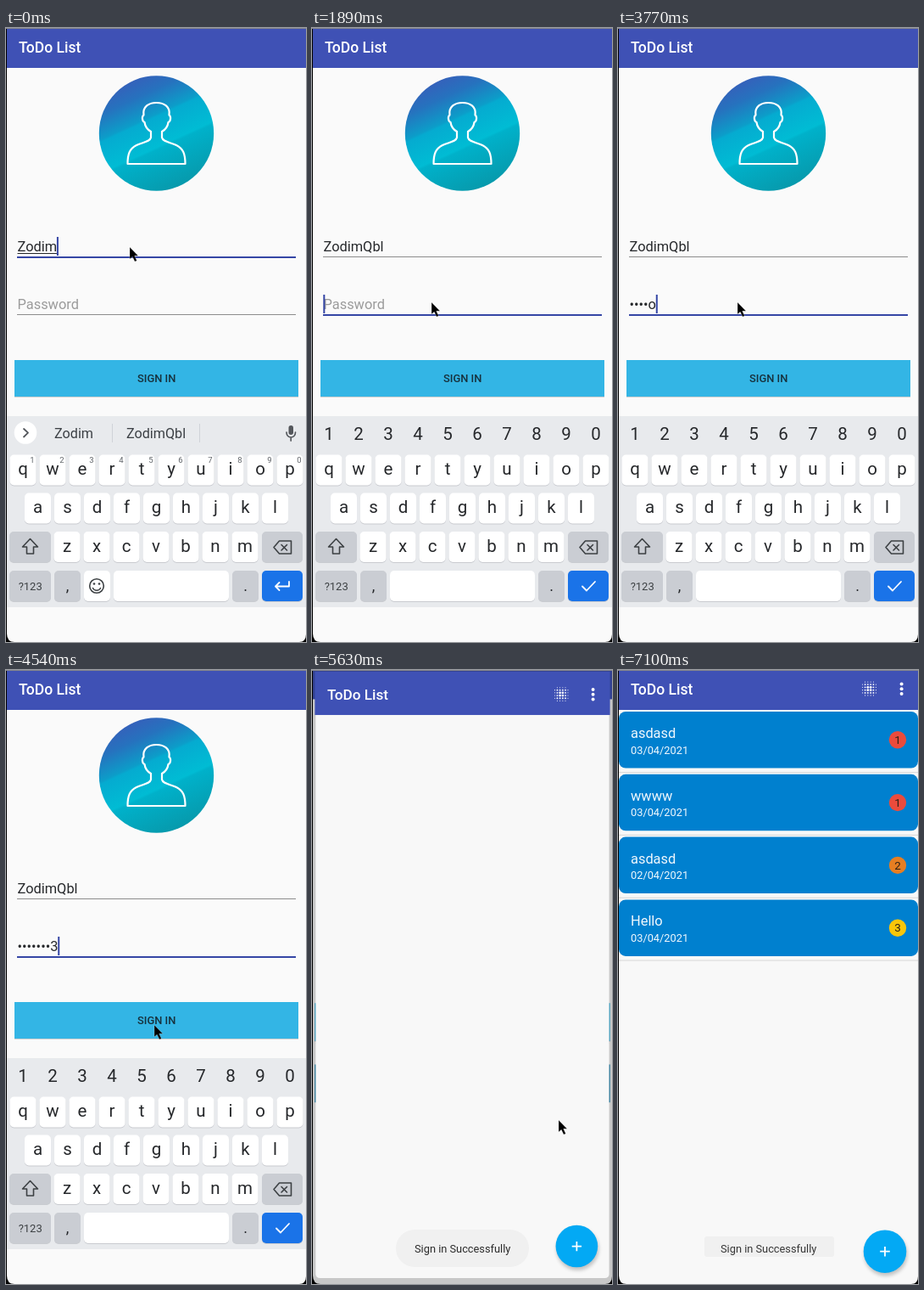
These frames come from a looping animation (354 by 723 pixels, 7.2 s). An HTML page:

```html
<!DOCTYPE html>
<html lang="en">
<head>
<meta charset="utf-8">
<title>ToDo List</title>
<style>
html, body { margin: 0; width: 100%; height: 100%; overflow: hidden; background: #fafafa; }
svg { display: block; width: 100%; height: 100%; }
text { font-family: Roboto, "Noto Sans", sans-serif; white-space: pre; }
.mid { text-anchor: middle; }
.line { fill: none; stroke-linecap: round; stroke-linejoin: round; }
</style>
</head>
<body>
<svg id="stage" viewBox="0 0 354 723" preserveAspectRatio="none"></svg>
<script>
const LOOP = 7200;
const NAME = 'Zodim', FULL = 'ZodimQbl', SECRET = 'Hello123';
const INK = '#26282b', BLUE = '#3f51b5', FOCUS = '#3546a5';

const rect = (x, y, w, h, fill, r = 0, more = '') =>
  `<rect x="${x}" y="${y}" width="${w}" height="${h}" rx="${r}" fill="${fill}" ${more}/>`;
const text = (x, y, size, str, fill = INK, more = '') =>
  `<text x="${x}" y="${y}" font-size="${size}" fill="${fill}" ${more}>${str}</text>`;
const mid = (x, y, size, str, fill = INK, more = '') =>
  text(x, y, size, str, fill, `class="mid" ${more}`);
const circle = (x, y, r, fill, more = '') =>
  `<circle cx="${x}" cy="${y}" r="${r}" fill="${fill}" ${more}/>`;
const line = (d, stroke, width, more = '') =>
  `<path class="line" d="${d}" stroke="${stroke}" stroke-width="${width}" ${more}/>`;
const group = (id, body) => `<g id="${id}">${body}</g>`;

function header() {
  return rect(0, -5, 355, 52, BLUE) + text(15, 29, 17.5, 'ToDo List', '#fff', 'font-weight="500"');
}

function avatar() {
  const head = 'M171 122C166 119 164 115 163.500 111C160.500 110 160 104 162.500 102.500' +
    'C161 93 168 88 177.500 88C187 88 194 93 192.500 102.500C195 104 194.500 110 191.500 111' +
    'C191 115 189 119 184 122';
  const body = 'M171 122V129C170 134 161 134.500 154 138C146 142 143.500 148 143.500 160' +
    'H211.500C211.500 148 209 142 201 138C194 134.500 185 134 184 129V122';
  return circle(177.5, 124, 67.7, 'url(#sky)') + line(head, '#fff', 2.2) + line(body, '#fff', 2.2);
}

function button(y, label, fill) {
  return rect(10, y, 335, 43, fill) + mid(177.7, y + 26, 12.9, label, '#17313d', 'font-weight="500"');
}

function key(cx, y, w, fill = '#fff') {
  return rect(cx - w / 2, y + 1, w, 36, '#c9cbd0', 5) + rect(cx - w / 2, y, w, 36, fill, 5);
}

function letters(row, x0, y) {
  return [...row].map((ch, i) => {
    const x = x0 + i * 35;
    return key(x, y, 31) + mid(x, y + 23.5, 20.5, ch);
  }).join('');
}

function keyboard() {
  const gray = '#cacdd3', digits = [...'1234567890'];
  const mic = rect(333.5, 468, 5.5, 11, '#54575c', 2.7) +
    line('M331 476C331 484 341.500 484 341.500 476M336.200 482V486', '#54575c', 1.7);
  const strip = circle(23, 476.5, 13.3, '#fff') +
    line('M21 472L26 476.700L21 481.500', '#54575c', 1.8) + mic +
    group('splits', rect(125, 466, 1, 22, '#d0d3d8') + rect(228, 466, 1, 22, '#d0d3d8')) +
    mid(80, 483, 16.2, NAME, '#3c4045', 'id="typed"') + mid(177, 483, 16.2, FULL, '#3c4045');
  const small = digits.map((d, i) => mid(31 + i * 35, 512, 9.5, d, '#5f6368')).join('');
  const smile = circle(107, 657, 8.3, 'none', 'stroke="#3c4043" stroke-width="1.6"') +
    circle(104, 654.5, 1.3, '#3c4043') + circle(110, 654.5, 1.3, '#3c4043') +
    line('M102.500 659.500C104 663 110 663 111.500 659.500', '#3c4043', 1.5);
  return rect(0, 457, 354, 225, '#e8eaed') +
    letters('qwertyuiop', 20, 502.5) + letters('asdfghjkl', 37.5, 547.5) + letters('zxcvbnm', 72, 593) +
    key(28.5, 593, 49, gray) + key(326, 593, 48, gray) +
    line('M28.500 601.500L19.500 611H24.500V619H32.500V611H37.500Z', '#3c4043', 1.6) +
    line('M322.500 604H336.500V619H322.500L316 611.500ZM325 608.500L331.500 615M331.500 608.500L325 615', '#3c4043', 1.6) +
    key(28.5, 639, 49, gray) + mid(28.7, 662, 13, '?123', '#3c4043') +
    key(72.5, 639, 31, gray) + mid(72.5, 663, 18, ',') +
    key(282.5, 639, 31, gray) + mid(282.5, 663, 18, '.') +
    key(326, 639, 48, '#1a73e8') +
    group('wordKeys', strip + small + key(107.5, 639, 31) + smile + key(195, 639, 136) +
      line('M334 652V657.500H318.500M322.500 653L318 657.500L322.500 662', '#fff', 1.8)) +
    group('passKeys', digits.map((d, i) => mid(20 + i * 35, 485, 20.5, d)).join('') +
      key(177.5, 639, 171) + line('M319 657.500L324 662.500L334 652', '#fff', 1.8));
}

function login() {
  return rect(0, 0, 354, 723, '#fafafa') + header() + avatar() +
    text(13.5, 263, 16.4, '', INK, 'id="user"') + rect(13.5, 265, 10, 1, INK, 0, 'id="compose"') +
    rect(13, 269, 329, 1, '#888', 0, 'id="userLine"') +
    text(13.5, 331, 16.4, '', INK, 'id="pass"') +
    rect(13, 337, 329, 1, '#888', 0, 'id="passLine"') +
    rect(0, 0, 2, 22, FOCUS, 0, 'id="caret"') +
    rect(10, 433, 335, 2, '#c9cdcf') + rect(11, 436, 333, 1, '#d5d7d8', 0, 'id="press"') +
    button(391, 'SIGN IN', '#33b5e5') + button(460.5, 'SIGN UP', '#0f7fae') +
    group('keyboard', rect(0, 455, 354, 268, '#fafafa') + keyboard());
}

// Soft dot matrix: larger dots near the middle, faint ones outside.
function dotIcon() {
  const at = [-7.9, -4.9, -1.65, 1.65, 4.9, 7.9];
  let out = '';
  at.forEach((x, i) => at.forEach((y, j) => {
    const ring = Math.max(Math.abs(i - 2.5), Math.abs(j - 2.5));
    const near = Math.min(Math.abs(i - 2.5), Math.abs(j - 2.5));
    if (ring > 2 && near > 2) return;
    out += circle(296.5 + x, 22 + y, ring < 1 ? 1.35 : ring < 2 ? 0.95 : 0.55, '#fff');
  }));
  return out;
}

function card([title, date, rank], i) {
  const y = 49 + i * 73.8;
  const tone = ['#ea4b3c', '#e67e22', '#f8c60a'][rank - 1];
  return rect(1, y, 353, 66.5, '#0080cf', 8) +
    text(15, y + 31, 16.4, title, '#f1f8fd') + text(15, y + 49.5, 12.8, date, '#f1f8fd') +
    circle(330, y + 33.3, 10.2, tone) + mid(330, y + 38, 13.5, rank, '#2b2118') +
    rect(1, y + 71, 353, 1.2, '#dcdcdc');
}

function list() {
  const items = [
    ['asdasd', '03/04/2021', 1], ['wwww', '03/04/2021', 1],
    ['asdasd', '02/04/2021', 2], ['Hello', '03/04/2021', 3]
  ];
  return rect(1, -5, 353, 728, '#f8f8f8', 5) + header() + dotIcon() +
    [16.5, 22.3, 28.1].map(y => circle(334.6, y, 2, '#fff')).join('') +
    group('cards', items.map(card).join('')) +
    circle(316, 688, 25.5, '#000', 'opacity=".22" filter="url(#soft)"') +
    circle(315, 684.7, 25.3, '#03a9f4') +
    line('M315 679V690.500M309.200 684.700H320.800', '#fff', 1.8, 'style="stroke-linecap:butt"');
}

const stage = document.getElementById('stage');
stage.innerHTML = `<defs>
  <linearGradient id="sky" x1=".22" y1="0" x2=".68" y2="1">
    <stop offset="0" stop-color="#3b5ab9"/><stop offset=".2" stop-color="#2672be"/>
    <stop offset=".38" stop-color="#0c9dc9"/><stop offset=".4" stop-color="#05abd0"/>
    <stop offset=".62" stop-color="#00bcd4"/><stop offset=".64" stop-color="#00b1ca"/>
    <stop offset="1" stop-color="#0798aa"/>
  </linearGradient>
  <filter id="soft" x="-30%" y="-30%" width="160%" height="160%"><feGaussianBlur stdDeviation="2.2"/></filter>
  </defs>` +
  group('login', login()) + rect(0, 0, 354, 723, '#000', 0, 'id="dim" opacity=".2"') +
  group('list', list()) +
  rect(99, 659, 157, 44, '#f0f0f0', 22, 'id="pill"') + rect(102, 667, 153, 24, '#f0f0f0', 3, 'id="patch"') +
  text(121, 686, 12.8, 'Sign in Successfully', '#2b2b2b', 'id="toast"') +
  '<path id="pointer" d="M0 0V14L3.200 11.300L6 17L8.400 15.900L5.700 10.300H10Z" fill="#000" stroke="#fff" stroke-opacity=".5" stroke-width=".5"/>' +
  '<path d="M0 0H354V723H0ZM1 0V713Q1 723 10 723H346Q354 723 354 714V0Z" fill="#000" fill-rule="evenodd"/>' +
  rect(0, 0, 354, 1, '#85858b');

const el = {};
stage.querySelectorAll('[id]').forEach(node => el[node.id] = node);
const show = (node, on) => node.setAttribute('visibility', on ? 'inherit' : 'hidden');
const set = (node, attrs) => { for (const k in attrs) node.setAttribute(k, attrs[k]); };
const zoom = (node, s) => node.setAttribute('transform', `translate(177.5 361) scale(${s}) translate(-177.5 -361)`);
const passed = (times, t) => times.filter(at => t >= at).length;

const userKeys = [530, 650, 770];
const passKeys = [2940, 3190, 3470, 3620, 3770, 4050, 4170, 4290];
const blinks = [380, 530, 1470, 1740, 2290, 2690, 4810];
const path = [
  [0, 146, 258], [1320, 149, 287], [1470, 147, 319], [1620, 141, 323],
  [4540, 175, 418], [4660, 175, 443], [4810, 175, 418], [5210, 239, 462],
  [5330, 289, 498], [5480, 292, 525], [5630, 291, 530], [5750, 286, 539],
  [5870, 267, 614], [6020, 264, 664], [6140, 260, 708], [6290, 260, 740]
];

function focusLine(node, on) {
  set(node, { height: on ? 2 : 1, fill: on ? FOCUS : '#8c8c8c' });
}

function drawForm(t) {
  const onPass = t >= 1740;
  const user = FULL.slice(0, NAME.length + passed(userKeys, t));
  const typed = passed(passKeys, t);
  const secret = typed ? '•'.repeat(typed - 1) + SECRET[typed - 1] : '';
  el.user.textContent = user;
  el.pass.textContent = secret || 'Password';
  el.pass.setAttribute('fill', secret ? INK : '#9b9b9b');
  focusLine(el.userLine, !onPass);
  focusLine(el.passLine, onPass);

  const userWidth = el.user.getComputedTextLength();
  const passWidth = secret ? el.pass.getComputedTextLength() : 0;
  el.compose.setAttribute('width', userWidth);
  show(el.compose, !onPass);
  set(el.caret, onPass ? { x: 13.3 + passWidth, y: 314 } : { x: 13.3 + userWidth, y: 246 });
  show(el.caret, passed(blinks, t) % 2 === 0);

  el.typed.textContent = user;
  show(el.typed, t < 920);
  show(el.splits, t < 1040);
  show(el.wordKeys, t < 1890);
  show(el.passKeys, t >= 1890);
  show(el.press, t >= 5060);
  show(el.keyboard, t < 5630);
}

function render(t) {
  const opening = t >= 5630 && t < 5750;
  drawForm(t);
  show(el.login, t < 5750);
  if (t >= 5750) ['caret', 'compose', 'typed', 'splits', 'wordKeys', 'passKeys', 'press', 'keyboard']
    .forEach(id => show(el[id], false));
  zoom(el.login, opening ? 1.04 : 1);
  show(el.dim, opening);
  show(el.list, t >= 5630);
  show(el.cards, t >= 5750);
  zoom(el.list, opening ? 0.981 : t < 5870 ? 0.997 : 1);

  show(el.pill, opening);
  show(el.patch, t >= 5870);
  show(el.toast, t >= 5210);
  el.toast.setAttribute('opacity', t < 5330 ? 0.6 : t < 7100 ? 1 : 0.94);

  const [, x, y] = path[passed(path.map(p => p[0]), t) - 1];
  el.pointer.setAttribute('transform', `translate(${x} ${y})`);
}

const start = performance.now();
function tick() {
  render((performance.now() - start) % LOOP);
  requestAnimationFrame(tick);
}
tick();
</script>
</body>
</html>
```
